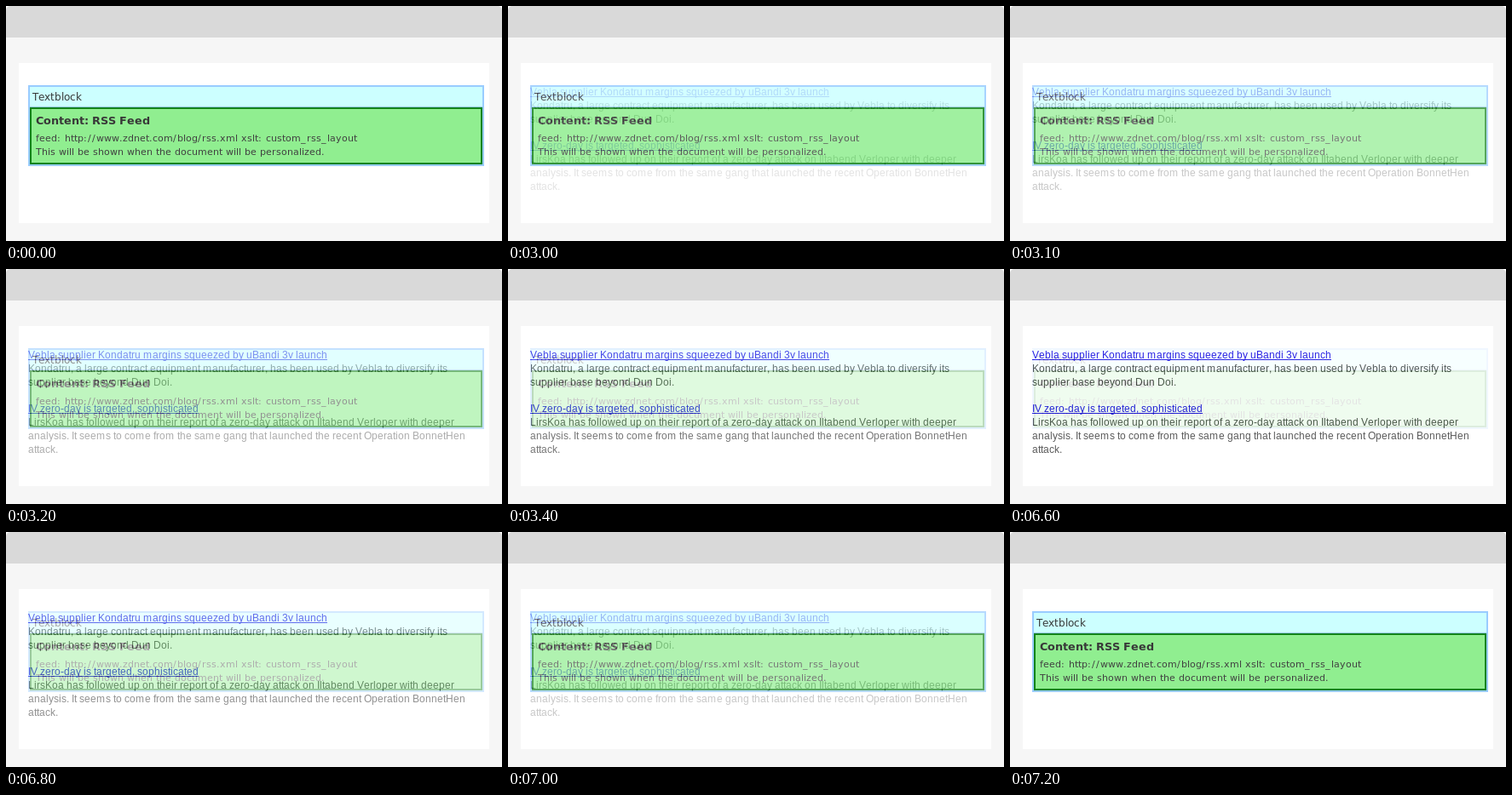
Recreate the animation shown at these times as an HTML page with a canvas. Size 582 by 276 pixels, loop 7.3 s.

```html
<!DOCTYPE html>
<html lang="en">
<head>
<meta charset="utf-8">
<title>RSS feed preview</title>
<style>
  html, body { margin: 0; width: 100%; height: 100%; overflow: hidden; background: #fff; }
  canvas { display: block; width: 582px; height: 276px; }
</style>
</head>
<body>
<canvas id="stage" width="582" height="276"></canvas>
<script>
const W = 582, H = 276;
const LOOP = 7300, STEP = 100, STEPS = 7;
const FADE_IN = 3000, FADE_OUT = 6600;

const VIEW_FONT = '"DejaVu Sans", Verdana, sans-serif';
const PAGE_FONT = '"Liberation Sans", Arial, sans-serif';
const LINK = '#1200e0', BODY = '#404040', DARK = '#383838';

// "wide" matches the characters that take one extra pixel
const styles = {
  label: { font: `12px ${VIEW_FONT}`, color: DARK },
  title: { font: `bold 12.8px ${VIEW_FONT}`, color: DARK },
  note: { font: `11px ${VIEW_FONT}`, color: '#404040', wide: /[\s:\/_.]/ },
  body: { font: `12px ${PAGE_FONT}`, color: BODY, wide: /m/ },
  link: { font: `12px ${PAGE_FONT}`, color: LINK, wide: /m/, underline: true }
};

const article = [
  ['link', 105, 'Vebla supplier Kondatru margins squeezed by uBandi 3v launch'],
  ['body', 121, 'Kondatru, a large contract equipment manufacturer, has been used by Vebla to diversify its'],
  ['body', 137, 'supplier base beyond Dun Doi.'],
  ['link', 168, 'IV zero-day is targeted, sophisticated'],
  ['body', 184, 'LirsKoa has followed up on their report of a zero-day attack on Iltabend Verloper with deeper'],
  ['body', 200, 'analysis. It seems to come from the same gang that launched the recent Operation BonnetHen'],
  ['body', 216, 'attack.']
];

function rect(c, color, x, y, w, h) {
  c.fillStyle = color;
  c.fillRect(x, y, w, h);
}

// Sets each character on whole pixels, as in hinted screen text
function write(c, name, x, y, text) {
  const style = styles[name];
  c.font = style.font;
  c.fillStyle = style.color;
  let pen = x;
  for (const ch of text) {
    c.fillText(ch, pen, y);
    pen += Math.round(c.measureText(ch).width);
    if (style.wide && style.wide.test(ch)) pen++;
  }
  if (style.underline) c.fillRect(x, y + 1, pen - x, 1);
}

function drawFrame(c) {
  rect(c, '#fff', 0, 0, W, H);
  c.fillStyle = '#f6f6f6';
  c.fillRect(0, 20, W, H - 20);
  c.fillStyle = '#d9d9d9';
  c.beginPath();
  c.roundRect(0, 0, W, 37, [5, 5, 0, 0]);
  c.fill();
  rect(c, '#fff', 15, 67, 552, 188);
}

function drawEditor(c) {
  rect(c, '#99ccff', 26, 93, 535, 95);
  rect(c, '#ccffff', 28, 95, 531, 23);
  rect(c, '#128319', 28, 119, 531, 67);
  rect(c, '#90ee90', 30, 121, 527, 63);
  write(c, 'label', 31, 111, 'Textblock');
  write(c, 'title', 35, 139, 'Content: RSS Feed');
  write(c, 'note', 35, 159, 'feed: http://www.zdnet.com/blog/rss.xml xslt: custom_rss_layout');
  write(c, 'note', 35, 175, 'This will be shown when the document will be personalized.');
}

function drawArticle(c) {
  for (const [style, y, text] of article) write(c, style, 26, y, text);
}

function makeLayer(draw) {
  const layer = document.createElement('canvas');
  layer.width = W;
  layer.height = H;
  const c = layer.getContext('2d');
  drawFrame(c);
  draw(c);
  return layer;
}

const editor = makeLayer(drawEditor);
const page = makeLayer(drawArticle);
const ctx = document.getElementById('stage').getContext('2d');

function fade(t, start) {
  const step = Math.floor((t - start) / STEP) + 1;
  return Math.min(STEPS, Math.max(0, step)) / STEPS;
}

function render() {
  const t = performance.now() % LOOP;
  ctx.globalAlpha = 1;
  ctx.drawImage(editor, 0, 0);
  ctx.globalAlpha = fade(t, FADE_IN) - fade(t, FADE_OUT);
  ctx.drawImage(page, 0, 0);
  requestAnimationFrame(render);
}
render();
</script>
</body>
</html>
```
